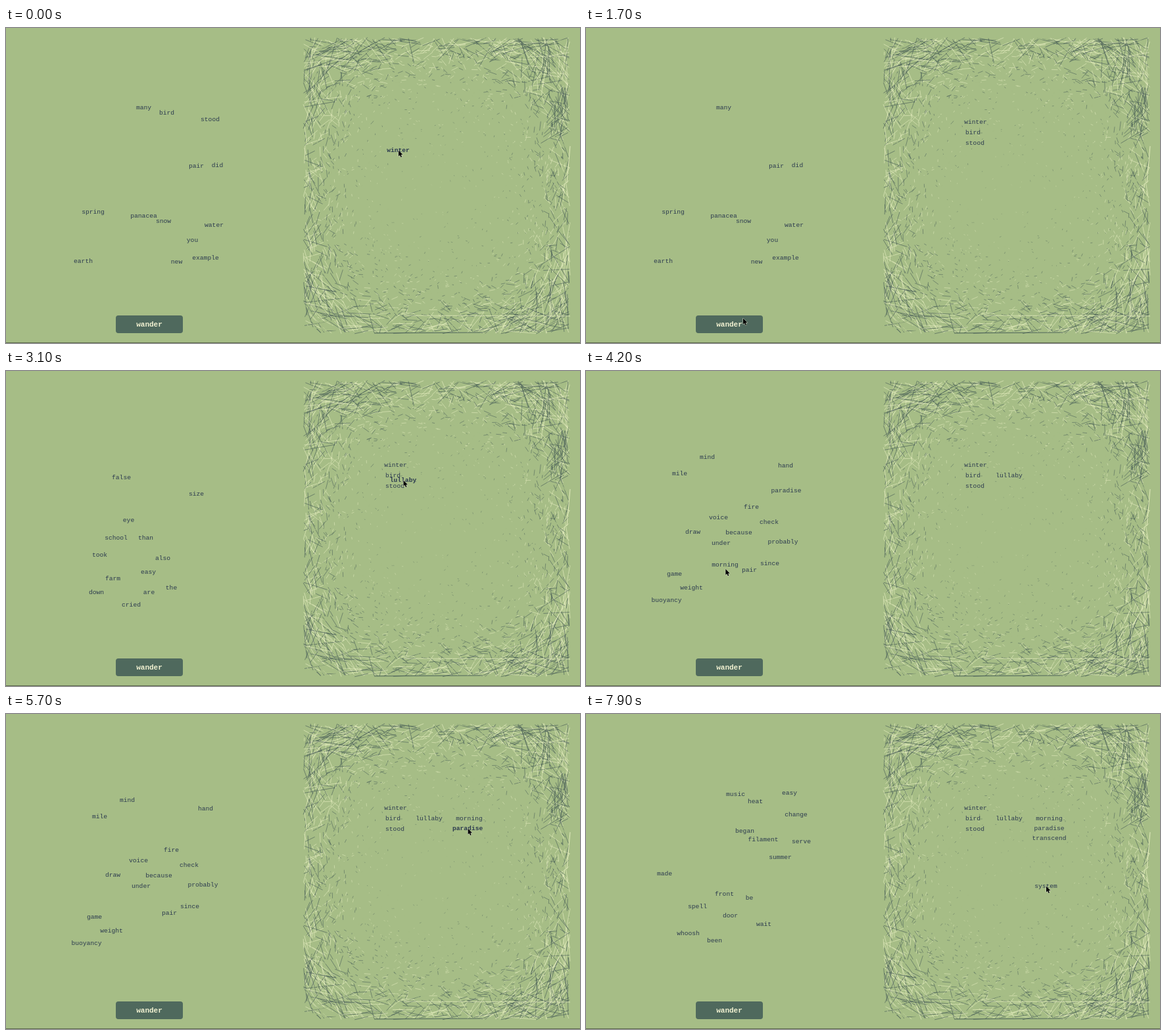
An HTML page with a canvas for the animation above (8000 ms loop, 873 px wide and 480 px high).

```html
<!DOCTYPE html>
<html lang="en">
<head>
<meta charset="utf-8">
<title>wander</title>
<style>
html, body { margin: 0; width: 100%; height: 100%; overflow: hidden; background: #a6bd86; }
canvas { display: block; }
</style>
</head>
<body>
<canvas id="stage" width="873" height="480"></canvas>
<script>
const LOOP = 8000, FADE = 200, REST = 50;
const BG = '#a6bd86', DARK = '#465c56', PALE = '#e9f0c2', INK = '#2c3b4f';
const FONT = '"Liberation Mono", "Courier New", monospace';
const ctx = document.getElementById('stage').getContext('2d');

// Words on offer, as "word x y" centres; each press of the button brings the next group.
const groups = [
  'winter 596 186,many 209 121,bird 244 129,stood 310 139,pair 289 210,did 321 209,spring 132 280,' +
    'panacea 209 286,snow 239 294,water 316 300,you 283 323,example 303 350,new 259 356,earth 117 355',
  'false 175 162,size 289 187,eye 186 227,school 167 254,than 212 254,took 142 280,also 238 285,' +
    'easy 216 306,farm 162 316,the 251 330,down 137 337,are 217 337,cried 190 356,lullaby 256 224',
  'mind 184 131,hand 303 144,mile 142 156,paradise 304 182,fire 251 207,voice 201 223,check 278 230,' +
    'draw 162 245,because 232 246,under 205 262,probably 299 260,since 279 293,morning 211 295,pair 248 303,' +
    'game 134 309,weight 160 330,buoyancy 122 349',
  'music 227 122,easy 309 120,heat 257 133,change 319 153,transcend 288 151,began 241 178,filament 269 191,' +
    'serve 327 194,summer 295 218,system 261 223,made 119 243,front 210 274,be 248 280,spell 169 293,' +
    'door 219 307,wait 270 320,whoosh 155 334,been 195 345'
].map(list => list.split(',').map(entry => {
  const [text, x, y] = entry.split(' ');
  return { text, x: +x, y: +y };
}));

// What the visitor does: drag a word somewhere, or press the button.
const drag = (text, start, end, x, y) => ({ text, start, end, x, y });
const press = (start, end, x, y) => ({ start, end, x, y });
const actions = [
  drag('winter', 60, 300, 592, 143), drag('bird', 640, 920, 588, 159), drag('stood', 1240, 1500, 591, 175),
  press(1750, 2300, 238, 442),
  drag('lullaby', 2700, 3200, 643, 159.5),
  press(3650, 4010, 219, 458),
  drag('morning', 4270, 4800, 704, 159), drag('paradise', 5300, 5720, 704, 174),
  press(6160, 6200, 219, 454),
  drag('transcend', 6570, 7080, 704, 189), drag('system', 7580, 7900, 699, 262)
];

// Pressing starts a new group; dragged words learn their own action.
const changes = actions.filter(a => !a.text).map(a => a.start + 40);
for (const a of actions) {
  const word = groups.flat().find(w => w.text === a.text);
  a.from = word ? { x: word.x, y: word.y } : a;
  if (word) word.action = a;
}

const clamp = (v, lo, hi) => Math.max(lo, Math.min(hi, v));
const glide = (a, b, t0, t1, t) => {
  const u = clamp((t - t0) / (t1 - t0), 0, 1), e = u * u * (3 - 2 * u);
  return { x: a.x + (b.x - a.x) * e, y: a.y + (b.y - a.y) * e };
};
const carry = (a, t) => glide(a.from, a, a.start, a.end, t);

function pointer(t) {
  const i = actions.findIndex(a => a.end >= t);
  if (i < 0) return actions[actions.length - 1];
  const a = actions[i], last = actions[i - 1];
  if (!last || t >= a.start) return carry(a, t);
  return glide(last, a.from, last.end + REST, a.start - REST, t);
}

function makePaper() {
  const paper = document.createElement('canvas');
  paper.width = 873;
  paper.height = 480;
  const g = paper.getContext('2d');
  let seed = 41;
  const rand = () => (seed = (seed * 16807) % 2147483647) / 2147483647;
  const line = (color, width, x0, y0, x1, y1) => {
    g.strokeStyle = color;
    g.lineWidth = width;
    g.beginPath();
    g.moveTo(x0, y0);
    g.lineTo(x1, y1);
    g.stroke();
  };
  g.fillStyle = BG;
  g.fillRect(0, 0, 873, 480);

  // Scratches run around the middle and grow longer and denser towards the rim.
  for (let i = 0; i < 14000; i++) {
    const u = rand() * 2 - 1, v = rand() * 2 - 1;
    const r = (Math.abs(u) ** 2.5 + Math.abs(v) ** 2.5) ** 0.4;
    if (rand() > Math.min(0.3, 0.04 + 0.4 * r ** 3)) continue;
    const half = 0.5 + rand() * Math.min(30, 1 + 22 * r ** 7);
    const angle = Math.atan2(u ** 3, -(v ** 3)) + (rand() + rand() - 1) * 1.5;
    const dx = Math.cos(angle) * half, dy = Math.sin(angle) * half;
    const mx = Math.abs(dx) + rand() * 4, my = Math.abs(dy) + rand() * 4;
    const x = clamp(655 + u * 203, 452 + mx, 858 - mx), y = clamp(240 + v * 226, 14 + my, 466 - my);
    const pick = rand(), color = pick < 0.46 ? DARK : pick < 0.86 ? PALE : BG;
    g.globalAlpha = clamp(0.3 + r * 0.6, 0, 0.9);
    line(color, color === BG ? 1.2 : 0.7, x - dx, y - dy, x + dx, y + dy);
  }
  line(DARK, 1, 560, 465, 725, 464);
  line(PALE, 0.8, 605, 438, 858, 439);
  line(PALE, 1, 858, 180, 853, 236);
  g.globalAlpha = 1;

  g.fillStyle = '#4f695d';
  g.beginPath();
  g.roundRect(167, 438, 102, 27, 4);
  g.fill();
  g.fillStyle = '#f2f2d2';
  g.font = `bold 11px ${FONT}`;
  g.textAlign = 'center';
  g.fillText('wander', 218, 455);
  g.fillStyle = 'rgba(45, 55, 40, 0.6)';
  g.fillRect(0, 479, 873, 1);
  return paper;
}

function drawWord(word, shown, t) {
  const a = word.action, moved = a && t >= a.start;
  const held = a && t >= a.start - REST - 10 && t <= a.end;
  const { x, y } = moved ? carry(a, t) : word;
  ctx.globalAlpha = moved ? 1 : shown;
  ctx.font = `${held ? 'bold ' : ''}9.6px ${FONT}`;
  ctx.fillStyle = INK;
  ctx.fillText(word.text, x + 0.5, y + 2.5);
}

const arrow = new Path2D('M0 0V9L2 7.2L3.5 10.5L5 9.8L3.7 6.6H6.5Z');

function drawPointer(t) {
  const { x, y } = pointer(t);
  ctx.save();
  ctx.translate(x + 1, y + 0.5);
  ctx.strokeStyle = '#dfe6d0';
  ctx.lineWidth = 1;
  ctx.stroke(arrow);
  ctx.fillStyle = '#000';
  ctx.fill(arrow);
  ctx.restore();
}

const paper = makePaper();
ctx.textAlign = 'center';

function frame() {
  const t = performance.now() % LOOP;
  const faded = time => clamp((t - time) / FADE, 0, 1);
  ctx.globalAlpha = 1;
  ctx.drawImage(paper, 0, 0);
  groups.forEach((words, i) => {
    const shown = (i ? faded(changes[i - 1]) : 1) * (1 - faded(changes[i] ?? LOOP));
    for (const word of words) drawWord(word, shown, t);
  });
  ctx.globalAlpha = 1;
  drawPointer(t);
  requestAnimationFrame(frame);
}
frame();
</script>
</body>
</html>
```
